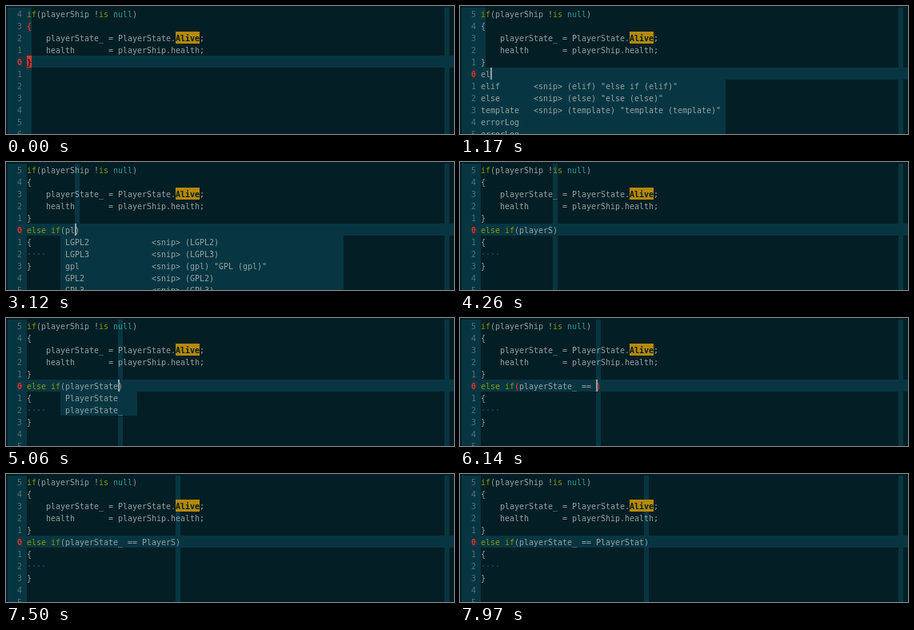
Recreate the animation shown at these times as an HTML page with a canvas. Size 560 by 160 pixels, loop 8000 ms.

```html
<!DOCTYPE html>
<html lang="en">
<head>
<meta charset="utf-8">
<title>Editor completion</title>
<style>
  html, body { margin: 0; width: 100%; height: 100%; overflow: hidden; background: #041e25; }
  canvas { display: block; width: 560px; height: 160px; }
</style>
</head>
<body>
<canvas id="stage" width="560" height="160"></canvas>
<script>
const ctx = document.getElementById('stage').getContext('2d', { alpha: false });
const LOOP = 8000, CELL = 6, ROW = 15, TOP = 2, LEFT = 26;
const FONT = '10px "DejaVu Sans Mono", monospace';
const color = {
  back: '#041e25', panel: '#073642', text: '#93a1a1', number: '#586e75', dots: '#0d4a5c',
  keyword: '#859900', constant: '#2aa198', red: '#dc322f', search: '#b58900', select: '#586e75'
};

const players = ['PlayerState', 'playerState_'];
const withShip = ['playerShip', ...players];
const snip = (word, gap, detail) => word.padEnd(gap) + '<snip> ' + detail;

// Completion menus: left column, width in cells, entries.
const menus = {
  e: [0, 51, [
    snip('elif', 11, '(elif) "else if (elif)"'),
    snip('else', 11, '(else) "else (else)"'),
    snip('template', 11, '(template) "template (template)"'),
    'errorLog', 'errorLog']],
  elif: [0, 51, [snip('elif', 11, '(elif) "else if (elif)"')]],
  p: [7, 16, withShip],
  pl: [7, 59, [
    snip('LGPL2', 18, '(LGPL2)'),
    snip('LGPL3', 18, '(LGPL3)'),
    snip('gpl', 18, '(gpl) "GPL (gpl)"'),
    snip('GPL2', 18, '(GPL2)'),
    snip('GPL3', 18, '(GPL3)')]],
  pla: [7, 55, withShip],
  player: [7, 16, withShip],
  playerS: [7, 24, withShip],
  state: [7, 24, players],
  exact: [7, 16, players],
  Pl: [23, 36, withShip],
  Play: [23, 29, withShip],
  Player: [23, 16, withShip],
  PlayerS: [23, 24, withShip],
  State: [23, 24, players]
};

// Typing: time, typed text, menu. Without a menu entry the caret is hidden too.
const word = [
  [540, ''], [580, '', 'none'],
  [970, 'e'], [1010, 'e', 'e'], [1130, 'el'], [1170, 'el', 'e'],
  [1320, 'eli'], [1370, 'eli', 'elif'], [1530, 'elif'], [1580, 'elif', 'elif'], [1930, 'elif']
];
const state = 'playerState_ == ';
const condition = [
  [2740, ''], [2780, 'p'], [2820, 'p', 'p'],
  [3080, 'pl'], [3120, 'pl', 'pl'], [3260, 'pla'], [3300, 'pla', 'pla'],
  [3540, 'play'], [3580, 'play', 'player'], [3660, 'playe'], [3710, 'playe', 'player'],
  [3870, 'player'], [3950, 'player', 'player'],
  [4260, 'playerS'], [4340, 'playerS', 'playerS'],
  [4510, 'playerSt'], [4560, 'playerSt', 'state'],
  [4660, 'playerSta'], [4710, 'playerSta', 'state'],
  [4810, 'playerStat'], [4860, 'playerStat', 'state'],
  [5020, 'playerState'], [5060, 'playerState', 'exact'],
  [5440, 'playerState_'], [5490, 'playerState_', 'none'],
  [5680, 'playerState_ '], [5720, 'playerState_ ', 'none'],
  [5820, 'playerState_ ='], [5860, 'playerState_ =', 'none'],
  [5950, 'playerState_ =='], [5990, 'playerState_ ==', 'none'],
  [6100, state], [6140, state, 'none'],
  [6330, state + 'P'], [6380, state + 'P', 'none'],
  [6540, state + 'Pl'], [6580, state + 'Pl', 'Pl'],
  [6650, state + 'Pla'], [6700, state + 'Pla', 'Pl'], [6930, state + 'Pla'],
  [6970, state + 'Play'], [7000, state + 'Play', 'Play'],
  [7080, state + 'Playe'], [7120, state + 'Playe', 'Player'],
  [7230, state + 'Player'], [7280, state + 'Player', 'Player'],
  [7500, state + 'PlayerS'], [7540, state + 'PlayerS', 'PlayerS'],
  [7640, state + 'PlayerSt'], [7680, state + 'PlayerSt', 'State'],
  [7800, state + 'PlayerSta'], [7840, state + 'PlayerSta', 'State'],
  [7970, state + 'PlayerStat']
];

const xOf = col => LEFT + col * CELL;
const yOf = row => TOP + row * ROW;
const latest = (steps, t) => steps.filter(step => step[0] <= t).pop();

function rect(x, y, w, h, fill) {
  ctx.fillStyle = fill;
  ctx.fillRect(x, y, w, h);
}

function write(row, col, str, fill = color.text, bold = false) {
  ctx.fillStyle = fill;
  ctx.font = (bold ? 'bold ' : '') + FONT;
  [...str].forEach((ch, i) => {
    if (ch !== ' ') ctx.fillText(ch, xOf(col + i), yOf(row) + 12);
  });
}

function drawPanels(cursorRow, band, highlight) {
  rect(0, 0, 560, 160, color.back);
  rect(2, TOP, 24, 158, color.panel);
  rect(xOf(87), TOP, CELL, 158, color.panel);
  if (highlight) {
    rect(xOf(band), TOP, CELL, 158, color.panel);
    rect(LEFT, yOf(cursorRow), 534, ROW, color.panel);
  }
  for (let row = 0; row < 11; row++) {
    const current = row === cursorRow;
    write(row, -2, String(Math.abs(row - cursorRow)), current ? color.red : color.number, current);
  }
}

function drawCode(matched) {
  write(0, 0, 'if', color.keyword);
  write(0, 2, '(playerShip !');
  write(0, 15, 'is', color.keyword);
  write(0, 18, 'null', color.constant);
  write(0, 22, ')');
  write(1, 0, '{', matched ? color.red : color.text, matched);
  write(2, 4, 'playerState_ = PlayerState.');
  rect(xOf(31), yOf(2), 5 * CELL, ROW, color.search);
  write(2, 31, 'Alive', color.back, true);
  write(2, 36, ';');
  write(3, 4, 'health       = playerShip.health;');
}

function drawCondition(typed, matched) {
  const paren = matched ? color.red : color.text;
  write(5, 0, 'else if', color.keyword);
  write(5, 7, '(', paren, matched);
  write(5, 8, typed);
  write(5, 8 + typed.length, ')', paren, matched);
  write(6, 0, '{');
  write(7, 0, '····', color.dots, true);
  write(8, 0, '}');
}

function drawMenu(name) {
  if (!menus[name]) return;
  const [col, width, entries] = menus[name];
  rect(xOf(col), yOf(6), width * CELL, entries.length * ROW, color.panel);
  entries.forEach((entry, i) => write(6 + i, col ? col + 1 : 0, entry));
}

function drawCaret(col) {
  rect(xOf(col), yOf(5), 2, ROW, color.text);
}

function draw(t) {
  if (t < 540) {
    const block = t < 40 || t >= 80;
    drawPanels(4, 0, true);
    drawCode(true);
    if (block) rect(LEFT, yOf(4), CELL, ROW, color.red);
    write(4, 0, '}', block ? color.back : color.red, true);
    return;
  }
  if (t < 1970) {
    const [, typed, menu] = latest(word, t);
    drawPanels(5, 0, true);
    drawCode(false);
    write(4, 0, '}');
    write(5, 0, typed);
    drawMenu(menu);
    if (menu) drawCaret(typed.length);
    return;
  }
  if (t < 2740) {
    const hint = '/*condition*/';
    drawPanels(5, 0, false);
    drawCode(false);
    write(4, 0, '}');
    drawCondition(hint, false);
    if (t >= 2070) {
      rect(xOf(8), yOf(5), hint.length * CELL, ROW, color.select);
      write(5, 8, hint, color.back);
    }
    return;
  }
  const [, typed, menu] = latest(condition, t);
  const col = 8 + typed.length;
  drawPanels(5, col, true);
  drawCode(false);
  write(4, 0, '}');
  drawCondition(typed, t >= 5720 && t < 6580);
  drawMenu(menu);
  if (menu) drawCaret(col);
}

const start = performance.now();
function tick() {
  draw((performance.now() - start) % LOOP);
  requestAnimationFrame(tick);
}
tick();
</script>
</body>
</html>
```
